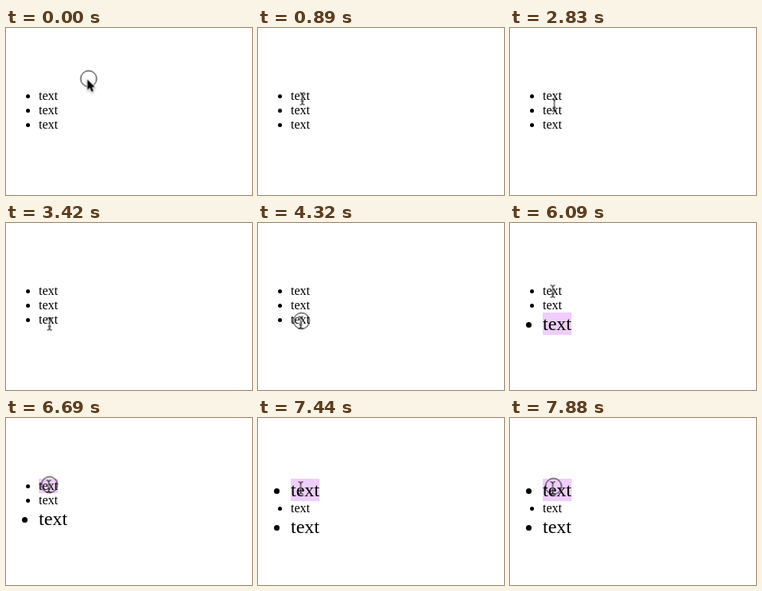
Animation of 308x209 px, one loop 8 s. Source, as an HTML page:

```html
<!DOCTYPE html>
<html lang="en">
<head>
<meta charset="utf-8">
<title>Double-click to enlarge</title>
<style>
  html, body { margin: 0; width: 100%; height: 100%; overflow: hidden; background: #fff; }
  svg { display: block; width: 308px; height: 209px; }
  text { font-family: "Liberation Serif", Times, serif; font-size: 16px; }
  .large text { font-size: 24px; }
  .mark { fill: #efcdfd; }

  /* Every change is a hard cut on one shared 8 s clock. */
  .cursor, .arrow, .beam, .ring, .mark, .small, .large, .rest {
    animation: 8s step-end infinite;
  }
  .cursor { animation-name: move; }
  .arrow { animation-name: arrow; }
  .beam { animation-name: beam; }
  .ring { animation-name: press; }
  .rest { animation-name: push; }
  .first .small { animation-name: first-small; }
  .first .large { animation-name: first-large; }
  .first .mark { animation-name: first-mark; }
  .last .small { animation-name: last-small; }
  .last .large { animation-name: last-large; }
  .last .mark { animation-name: last-mark; }

  @keyframes move {
    0% { transform: translate(103.5px, 63.5px); }
    5.625% { transform: translate(98.5px, 65.5px); }
    7.5% { transform: translate(81.5px, 73.5px); }
    9.25% { transform: translate(62.5px, 83.5px); }
    11.125% { transform: translate(56.5px, 86.5px); }
    35.375% { transform: translate(56.5px, 94.5px); }
    37.25% { transform: translate(56.5px, 104.5px); }
    39% { transform: translate(55.5px, 113.5px); }
    40.875% { transform: translate(55.5px, 121.5px); }
    42.75% { transform: translate(55.5px, 124.5px); }
    46.5% { transform: translate(55.5px, 123.5px); }
    48.375% { transform: translate(54.5px, 122.5px); }
    68.75% { transform: translate(54.5px, 117.5px); }
    70.625% { transform: translate(54.5px, 106.5px); }
    72.5% { transform: translate(54.5px, 95.5px); }
    74.25% { transform: translate(54.5px, 87.5px); }
    76.125% { transform: translate(54.5px, 83.5px); }
    93%, 100% { transform: translate(54.5px, 85.5px); }
  }
  @keyframes arrow { 0% { opacity: 1; } 9.25%, 100% { opacity: 0; } }
  @keyframes beam { 0% { opacity: 0; } 9.25%, 100% { opacity: 1; } }
  @keyframes press {
    0%, 16.75%, 54%, 57.5%, 79.875%, 83.625%, 94.875%, 98.5%, 100% { opacity: 1; }
    1.875%, 18.625%, 55.75%, 59.375%, 81.75%, 85.5%, 96.75% { opacity: 0; }
  }
  @keyframes push {
    0% { transform: translateY(0); }
    85.5%, 100% { transform: translateY(10px); }
  }
  @keyframes first-small { 0% { opacity: 1; } 85.5%, 100% { opacity: 0; } }
  @keyframes first-large { 0% { opacity: 0; } 85.5%, 100% { opacity: 1; } }
  @keyframes first-mark {
    0%, 96.75% { opacity: 0; }
    83.625%, 98.5%, 100% { opacity: 1; }
  }
  @keyframes last-small { 0% { opacity: 1; } 59.375%, 100% { opacity: 0; } }
  @keyframes last-large { 0% { opacity: 0; } 59.375%, 100% { opacity: 1; } }
  @keyframes last-mark {
    0%, 79.875%, 100% { opacity: 0; }
    57.5% { opacity: 1; }
  }
</style>
</head>
<body>
<svg viewBox="0 0 308 209">
  <g class="first" transform="translate(0 76)">
    <g class="small">
      <rect class="mark" x="41" width="24" height="18"/>
      <circle cx="27.5" cy="9.5" r="2.5"/><text x="41" y="14">text</text>
    </g>
    <g class="large">
      <rect class="mark" x="41" width="36" height="28"/>
      <circle cx="23.5" cy="15.5" r="3.5"/><text x="41" y="22">text</text>
    </g>
  </g>
  <g class="rest">
    <g transform="translate(0 94)">
      <circle cx="27.5" cy="9.5" r="2.5"/><text x="41" y="14">text</text>
    </g>
    <g class="last" transform="translate(0 112)">
      <g class="small">
        <rect class="mark" x="41" width="24" height="18"/>
        <circle cx="27.5" cy="9.5" r="2.5"/><text x="41" y="14">text</text>
      </g>
      <g class="large">
        <rect class="mark" x="41" width="36" height="28"/>
        <circle cx="23.5" cy="15.5" r="3.5"/><text x="41" y="22">text</text>
      </g>
    </g>
  </g>

  <!-- The cursor's origin is the centre of the click ring. -->
  <g class="cursor">
    <circle class="ring" r="10" fill="none" stroke="#000"/>
    <g class="arrow">
      <path d="M-1.5 1V14L1.5 11.3L3.7 16.3L6 15.3L3.9 10.4H7.8Z"
            stroke="#fff" stroke-width="1.6" paint-order="stroke"
            style="filter: drop-shadow(0 1px 1px #0005)"/>
    </g>
    <g class="beam" transform="translate(-1 2)" fill="none">
      <path d="M0 -6V6M-2 3H2" stroke="#fff" stroke-width="2.4" opacity=".5"/>
      <path d="M-3 -7.5H-2Q0 -7.5 0 -5.5Q0 -7.5 2 -7.5H3M-3 7.5H-2Q0 7.5 0 5.5Q0 7.5 2 7.5H3M0 -6V6M-2 3H2"
            stroke="#000"/>
    </g>
  </g>
</svg>
</body>
</html>
```
